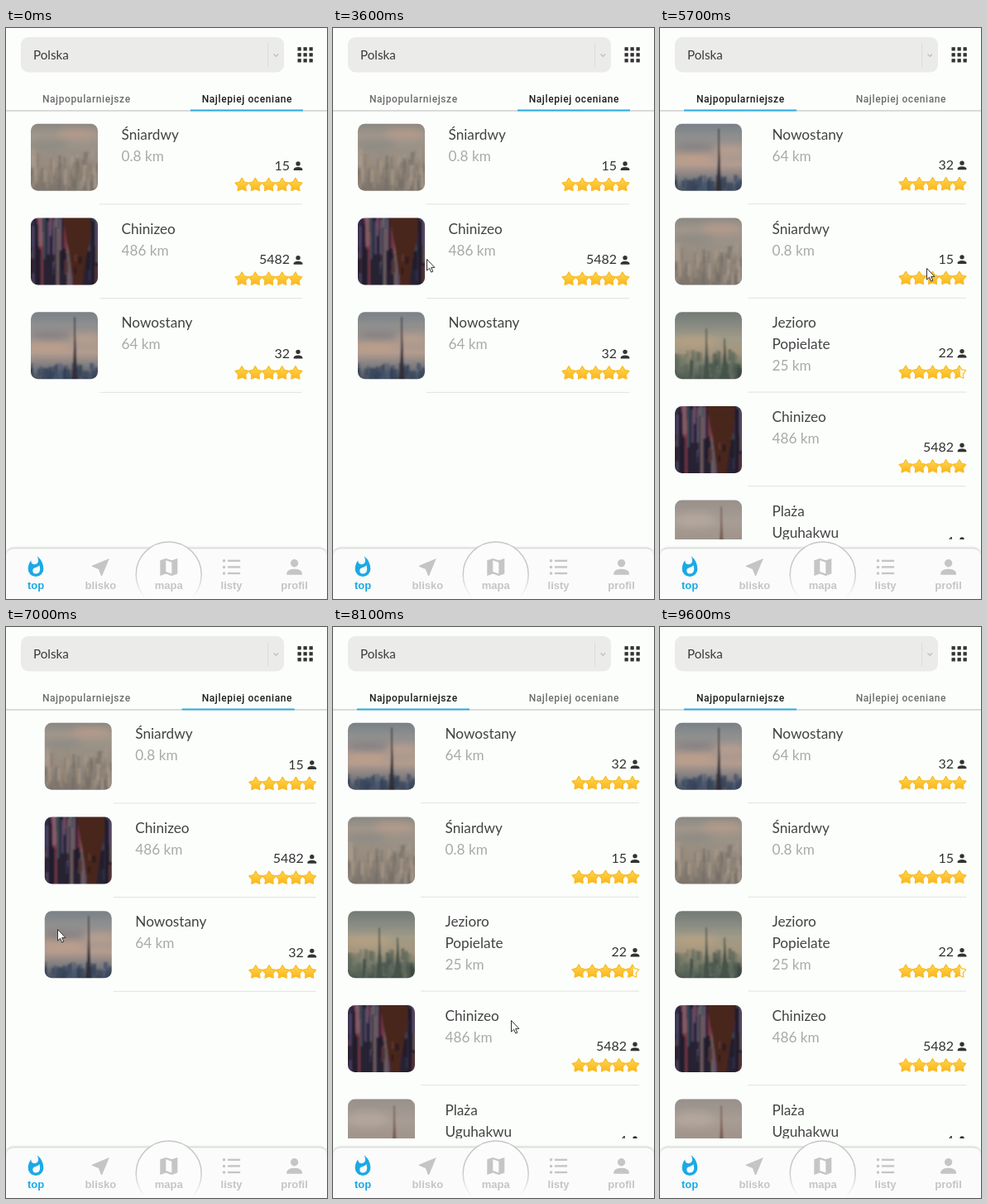
Recreate the animation shown at these times as an HTML page. Size 388 by 690 pixels, loop 9700 ms.

```html
<!DOCTYPE html>
<html lang="pl">
<head>
<meta charset="utf-8">
<title>Najlepiej oceniane</title>
<style>
html, body { margin: 0; width: 100%; height: 100%; overflow: hidden; background: #fcfefc; }
svg { display: block; }
text { font-family: Lato, sans-serif; }
.title, .dist { font-size: 17.2px; fill: #434343; }
.dist { fill: #a9a9a9; }
.count { font-size: 16px; fill: #333; text-anchor: end; }
.tab { font: 500 12px Roboto, Arial, sans-serif; letter-spacing: .6px; fill: #6c6c6c; text-anchor: middle; }
.tab.on { fill: #1c1c1c; }
.nav { font: bold 13px "Liberation Sans", Arial, sans-serif; text-anchor: middle; }
</style>
</head>
<body>
<svg width="388" height="690" viewBox="0 0 388 690">
  <defs>
    <clipPath id="list"><rect y="101" width="388" height="517"/></clipPath>
    <clipPath id="round"><rect width="81" height="81" rx="8.5"/></clipPath>
    <filter id="soft"><feGaussianBlur stdDeviation="1"/></filter>
    <filter id="haze" x="-50%" y="-80%" width="200%" height="260%"><feGaussianBlur stdDeviation="4"/></filter>
    <filter id="shade" x="-10%" y="-30%" width="120%" height="160%">
      <feDropShadow dx="0" dy="-1" stdDeviation="1.6" flood-opacity=".26"/>
    </filter>
    <linearGradient id="gold" x2="0" y2="1">
      <stop stop-color="#ffd84e"/><stop offset="1" stop-color="#fbb41c"/>
    </linearGradient>
    <linearGradient id="fade" x2="0" y2="1">
      <stop offset=".45" stop-color="#c6c6c6"/><stop offset=".85" stop-color="#c6c6c6" stop-opacity="0"/>
    </linearGradient>
    <g id="person"><circle cx="12" cy="8" r="4"/><path d="M4 20V18Q5 14 12 14T20 18V20Z"/></g>
  </defs>

  <rect width="388" height="690" fill="#fcfefc"/>
  <rect x="18" y="11" width="318" height="42.5" rx="9" fill="#ebecea"/>
  <path d="M316.5 18V47" stroke="#dcdcdc"/>
  <path d="M323.5 31.5l2.8 2.8 2.8-2.8" fill="none" stroke="#bdbdbd" stroke-width="1.2"/>
  <text x="33" y="38" font-size="15.2" fill="#3a3a3a">Polska</text>
  <g id="grid"></g>

  <text class="tab" x="97.3" y="90.2">Najpopularniejsze</text>
  <text class="tab" x="291.4" y="90.2">Najlepiej oceniane</text>
  <path d="M0 100H388" stroke="#cfcfcf" stroke-width="1.4"/>
  <rect id="bar" y="98.5" width="136" height="2" fill="#30ade6"/>

  <g clip-path="url(#list)"><g id="pages"></g></g>

  <rect y="629.5" width="388" height="75" rx="9" fill="#fafbfa" filter="url(#shade)"/>
  <circle cx="196.7" cy="660.5" r="39.5" fill="#fbfcfb" stroke="url(#fade)" stroke-width="1.5"/>
  <g id="nav"></g>
  <path id="cursor" d="M0 0V13.6L3.1 10.7L5.2 15.6L7.3 14.7L5.2 9.9H9.4Z" fill="#fff" stroke="#333"/>
</svg>
<script>
const $ = id => document.getElementById(id);
const LOOP = 9700, STEP = 100, WIDTH = 388, ROW = 113.7, STAR = 16.2;
const times = (n, f) => Array.from({ length: n }, (_, i) => f(i)).join('');

let seed = 7;
const rnd = (a, b) => {
  seed = (seed * 16807) % 2147483647;
  return a + (b - a) * seed / 2147483647;
};
const pick = list => list[Math.floor(rnd(0, list.length))];
const rect = (x, y, w, h, fill, o = 1) =>
  `<rect x="${x}" y="${y}" width="${w}" height="${h}" fill="${fill}" opacity="${o}"/>`;
const glow = (x, y, rx, ry, fill) =>
  `<ellipse cx="${x}" cy="${y}" rx="${rx}" ry="${ry}" fill="${fill}" opacity=".7" filter="url(#haze)"/>`;
const spire = (x, top, w, fill) =>
  `<path d="M${x - w} 84Q${x} 60 ${x} ${top}Q${x + 1} 60 ${x + w} 84Z" fill="${fill}" stroke="${fill}"/>`;

function sky(id, colors) {
  const stops = colors.map((c, i) => `<stop offset="${i / (colors.length - 1)}" stop-color="${c}"/>`).join('');
  return `<linearGradient id="${id}" x2="0" y2="1">${stops}</linearGradient>` + rect(-4, -4, 89, 89, `url(#${id})`);
}
const blocks = (n, top, low, colors) => times(n, () =>
  rect(rnd(-3, 80), rnd(top, low), rnd(2, 5), rnd(8, 24), pick(colors), .6));

// Soft flat stand-ins for the row pictures.
const photos = {
  tower: () => sky('skyA', ['#747d85', '#8c8e8f', '#a0948d', '#b39c8f', '#77797e', '#3a4554'])
    + glow(22, 42, 26, 4, '#cda588') + glow(66, 32, 20, 5, '#c6a592') + glow(24, 28, 26, 4, '#74767b')
    + blocks(45, 60, 72, ['#2d3b50', '#465870', '#34425a']) + spire(53, 6, 3.5, '#332f38'),
  city: () => sky('skyB', ['#84857f', '#a0968c', '#9a9186', '#978b7f', '#877d73', '#77706a'])
    + glow(56, 12, 24, 6, '#bd9d8b') + glow(22, 26, 24, 5, '#868782')
    + blocks(80, 30, 70, ['#aa9c8d', '#81786e', '#998a7b', '#736d66']),
  streaks: () => rect(-4, -4, 89, 89, '#282332')
    + times(50, () => rect(rnd(-3, 80), rnd(-50, 30), rnd(1.5, 5), rnd(40, 90),
      pick(['#5d4d75', '#8a6a80', '#426c78', '#943f4e', '#201b26', '#85736f', '#35324f']), .7))
    + '<path d="M38 -4H72Q74 30 66 50L62 85H52L46 42Z" fill="#4a251f"/>'
    + blocks(10, 40, 60, ['#1d171d', '#74433d']),
  skyline: () => sky('skyD', ['#6d756f', '#858982', '#a19b87', '#a5967e', '#6d7668', '#3f4b45'])
    + glow(24, 36, 28, 6, '#bfa482')
    + blocks(55, 45, 70, ['#46554e', '#596459', '#36443f', '#717765'])
    + spire(38, 20, 4, '#44534c') + spire(60, 32, 6, '#44524a'),
  beach: () => sky('skyE', ['#958f89', '#a89d94', '#9c9087', '#887c73'])
    + glow(24, 24, 24, 9, '#b8aba0') + spire(56, 8, 7, '#76564c')
};
const photoDefs = Object.keys(photos).map(id =>
  `<g id="${id}" clip-path="url(#round)"><g filter="url(#soft)">${photos[id]()}</g></g>`).join('');

const star = Array.from({ length: 10 }, (_, i) => {
  const r = i % 2 ? 4.7 : 8.4, a = i * Math.PI / 5 - Math.PI / 2;
  return r * Math.cos(a) + ',' + r * Math.sin(a);
});
const starRow = fill => times(5, i =>
  `<polygon points="${star.join(' ')}" transform="translate(${(i + .5) * STAR} 9.6)" fill="${fill}" stroke="#f9bd2c" stroke-width="1.1" stroke-linejoin="round"/>`);

let clips = 0;
function stars(x, y, score) {
  const id = 'score' + clips++;
  return `<g transform="translate(${x} ${y})">
    <clipPath id="${id}"><rect x="-1" y="-1" width="${score * STAR + 2}" height="22"/></clipPath>
    ${starRow('#fff8e2')}<g clip-path="url(#${id})">${starRow('url(#gold)')}</g></g>`;
}

function row([photo, name, dist, count, score], i, { x, text, line, right, drop }) {
  const lines = name.split('|');
  const titles = lines.map((n, k) => `<text class="title" x="${text}" y="${135 + 26 * k}">${n}</text>`).join('');
  return `<g transform="translate(0 ${i * ROW})">
    <use href="#${photo}" x="${x}" y="115.8"/>${titles}
    <text class="dist" x="${text}" y="${135 + 26 * lines.length}">${dist}</text>
    <text class="count" x="${right - 15}" y="${171 + drop}">${count}</text>
    <use href="#person" fill="#333" transform="translate(${right - 13} ${157.8 + drop}) scale(.67)"/>
    ${stars(right - 81, 179.4 + drop, score)}
    <path d="M${line} ${212.6 + drop * .4}H${right}" stroke="#e0e2e0"/>
  </g>`;
}

const tower = ['tower', 'Nowostany', '64 km', 32, 5];
const lake = ['city', 'Śniardwy', '0.8 km', 15, 5];
const far = ['streaks', 'Chinizeo', '486 km', 5482, 4.9];
const popular = [tower, lake, ['skyline', 'Jezioro|Popielate', '25 km', 22, 4.5], far,
  ['beach', 'Plaża|Uguhakwu', '31 km', 4, 5]];
const best = [lake, far, tower];
const left = { x: 18, text: 135.5, line: 106, right: 370, drop: 0 };
const right = { x: 30, text: 139.5, line: 113, right: 358, drop: .8 };

$('pages').innerHTML = `<defs>${photoDefs}</defs>`
  + popular.map((r, i) => row(r, i, left)).join('')
  + `<g transform="translate(${WIDTH} 0)">${best.map((r, i) => row(r, i, right)).join('')}</g>`;

$('grid').innerHTML = times(9, i => rect(352.5 + i % 3 * 7, 23.2 + Math.floor(i / 3) * 7, 4.3, 4.3, '#333'));

const icons = {
  top: '<path d="M13.5.7Q17 8.6 10.8 9.2 6.6 9 7.2 5.1 4 9 4 14A8 8 0 0 0 20 14Q20 6 13.5.7ZM11.7 19A3.2 3.2 0 0 1 11.3 12.7Q14.3 12 15.9 10.2 18 19 11.7 19Z"/>',
  blisko: '<path d="M21 3L3 10.5v1l6.8 2.7L12.5 21h1L21 3z"/>',
  mapa: '<path d="M21 3L15 5.1 9 3 3 5V21L9 18.9l6 2.1 6-2zM15 19l-6-2.1V5l6 2.1z"/>',
  listy: times(3, i => `<circle cx="4.2" cy="${5.5 + i * 6.5}" r="1.5"/>` + rect(8, 4.5 + i * 6.5, 13, 2, 'inherit')),
  profil: '<use href="#person"/>'
};
const navX = [36, 114.4, 196.8, 272.6, 348.6];
$('nav').innerHTML = Object.keys(icons).map((name, i) =>
  `<g fill="${i ? '#c5c5c5' : '#1ba9e6'}"><g transform="translate(${navX[i] - 14} 637.4) scale(1.167)">${icons[name]}</g>
  <text class="nav" x="${navX[i]}" y="677.5">${name}</text></g>`).join('');

// Each swipe follows the finger for `drag` pixels, then glides to the page.
const swipes = [
  { to: 0, start: 3800, drop: 5000, end: 5300, drag: 180 },
  { to: 1, start: 6000, drop: 6700, end: 7200, drag: 250 },
  { to: 0, start: 7400, drop: 7700, end: 8000, drag: 150 }
];
const mouse = [[3500, 30, 276], [3600, 113, 279], [3800, 95, 283], [5000, 275, 287], [5700, 322, 290],
  [6000, 322, 295], [7000, 62, 365], [7400, 63, 386], [8100, 215, 475], [8800, 392, 500]];

const part = (t, a, b) => Math.min(1, Math.max(0, (t - a) / (b - a)));
const mix = (a, b, p) => a + (b - a) * p;
const easeOut = (p, power) => 1 - (1 - p) ** power;

function pose(t) {
  let page = 1, scroll = WIDTH, bar = 1;
  for (const s of swipes) {
    if (t < s.start) break;
    const glide = part(t, s.drop, s.end);
    const held = scroll + Math.sign(s.to - page) * s.drag * part(t, s.start, s.drop);
    scroll = mix(held, s.to * WIDTH, easeOut(glide, 2.3));
    bar = mix(page, s.to, easeOut(glide, 3.2));
    if (t >= s.drop) page = s.to;
  }
  return { page, scroll, bar };
}

function pointer(t) {
  const i = mouse.findIndex(m => m[0] > t);
  if (i < 1) return null;
  const a = mouse[i - 1], b = mouse[i], p = part(t, a[0], b[0]);
  return [mix(a[1], b[1], p) + .5, mix(a[2], b[2], p) + .5];
}

const tabs = document.querySelectorAll('.tab');
function draw() {
  const t = Math.floor(performance.now() % LOOP / STEP) * STEP;
  const { page, scroll, bar } = pose(t), tip = pointer(t);
  $('pages').setAttribute('transform', `translate(${-scroll} 0)`);
  $('bar').setAttribute('x', mix(29, 223, bar));
  tabs.forEach((tab, i) => tab.classList.toggle('on', i === page));
  $('cursor').style.display = tip ? '' : 'none';
  if (tip) $('cursor').setAttribute('transform', `translate(${tip})`);
  requestAnimationFrame(draw);
}
draw();
</script>
</body>
</html>
```
